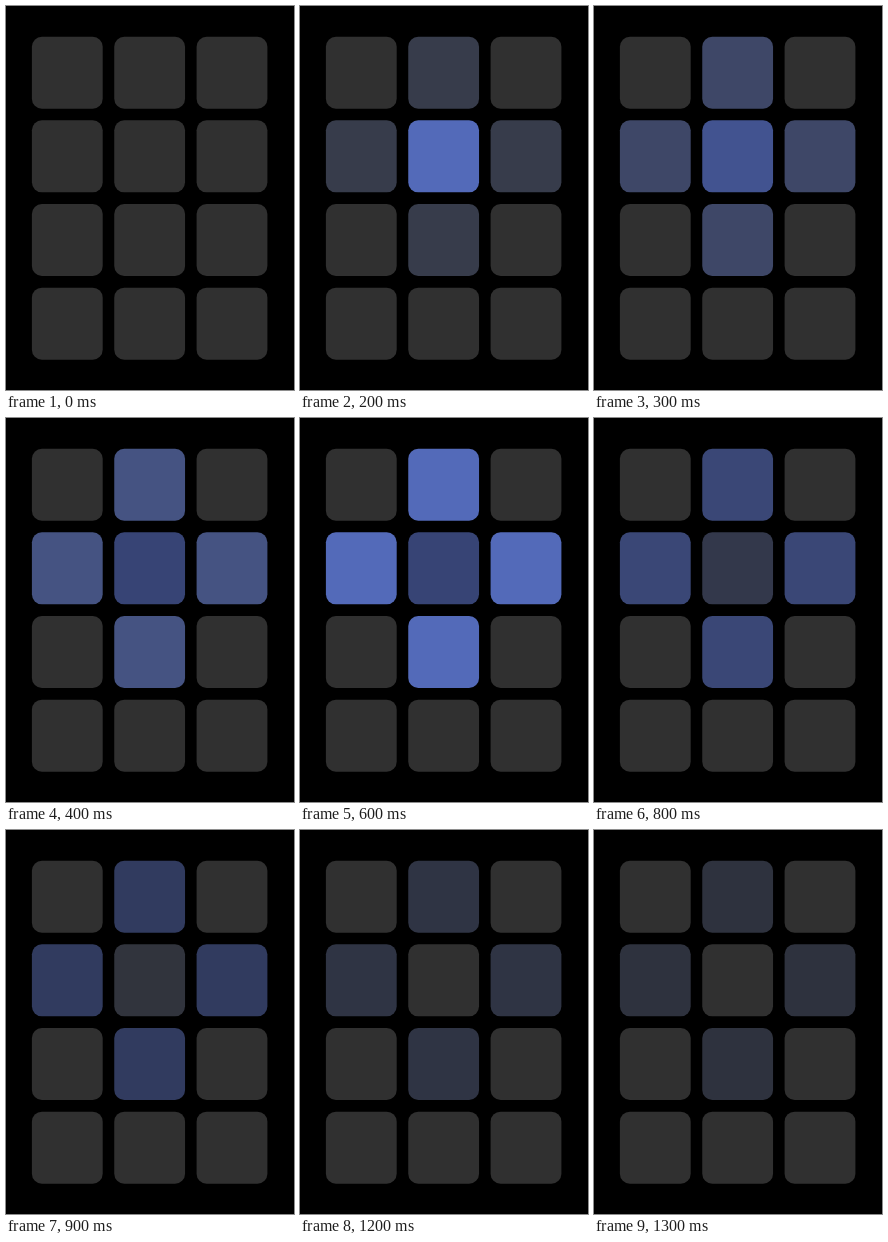
Write an HTML page that moves like this. It is 288 by 384 pixels and loops after 2400 ms.

```html
<!DOCTYPE html>
<html>
<head>
<meta charset="utf-8">
<style>
  html, body { margin: 0; width: 100%; height: 100%; overflow: hidden; background: #000; }
  svg { display: block; }
</style>
</head>
<body>
<svg id="stage" width="288" height="384" viewBox="0 0 288 384"></svg>
<script>
const LOOP = 2400, STEP = 100;
const BASE = [48, 48, 48], LIGHT = [83, 106, 185], DEEP = [55, 68, 117];
const NAVY = [49, 59, 95], DIM = [46, 50, 62];

// Each pulse rises linearly to LIGHT, then every fade starts fast and slows down
const CENTRE = [[0, BASE], [200, LIGHT], [400, DEEP], [600, DEEP], [1000, BASE]];
const RING = [[100, BASE], [600, LIGHT], [900, NAVY], [1300, DIM]];

const stage = document.getElementById('stage');
const tiles = Array.from({ length: 12 }, (_, i) => {
  const tile = document.createElementNS('http://www.w3.org/2000/svg', 'rect');
  const attrs = {
    x: 25.9 + (i % 3) * 82.35,
    y: 30.7 + Math.floor(i / 3) * 83.65,
    width: 70.8, height: 72, rx: 10,
    fill: `rgb(${BASE})`
  };
  for (const name in attrs) tile.setAttribute(name, attrs[name]);
  return stage.appendChild(tile);
});

function colourAt(pulse, t) {
  const next = pulse.findIndex(([time]) => time > t);
  if (next === 0) return `rgb(${BASE})`;
  if (next < 0) return `rgb(${pulse[pulse.length - 1][1]})`;
  const [start, from] = pulse[next - 1], [end, to] = pulse[next];
  const progress = (t - start) / (end - start);
  const k = to === LIGHT ? progress : progress ** 0.73;
  return `rgb(${from.map((c, i) => Math.round(c + (to[i] - c) * k))})`;
}

function draw() {
  let t = Math.floor(performance.now() % LOOP / STEP) * STEP;
  if (t > 900 && t < 1200) t = 900; // pause before the last of the glow goes
  const ring = colourAt(RING, t);
  tiles[4].setAttribute('fill', colourAt(CENTRE, t));
  for (const i of [1, 3, 5, 7]) tiles[i].setAttribute('fill', ring);
  requestAnimationFrame(draw);
}
draw();
</script>
</body>
</html>
```
